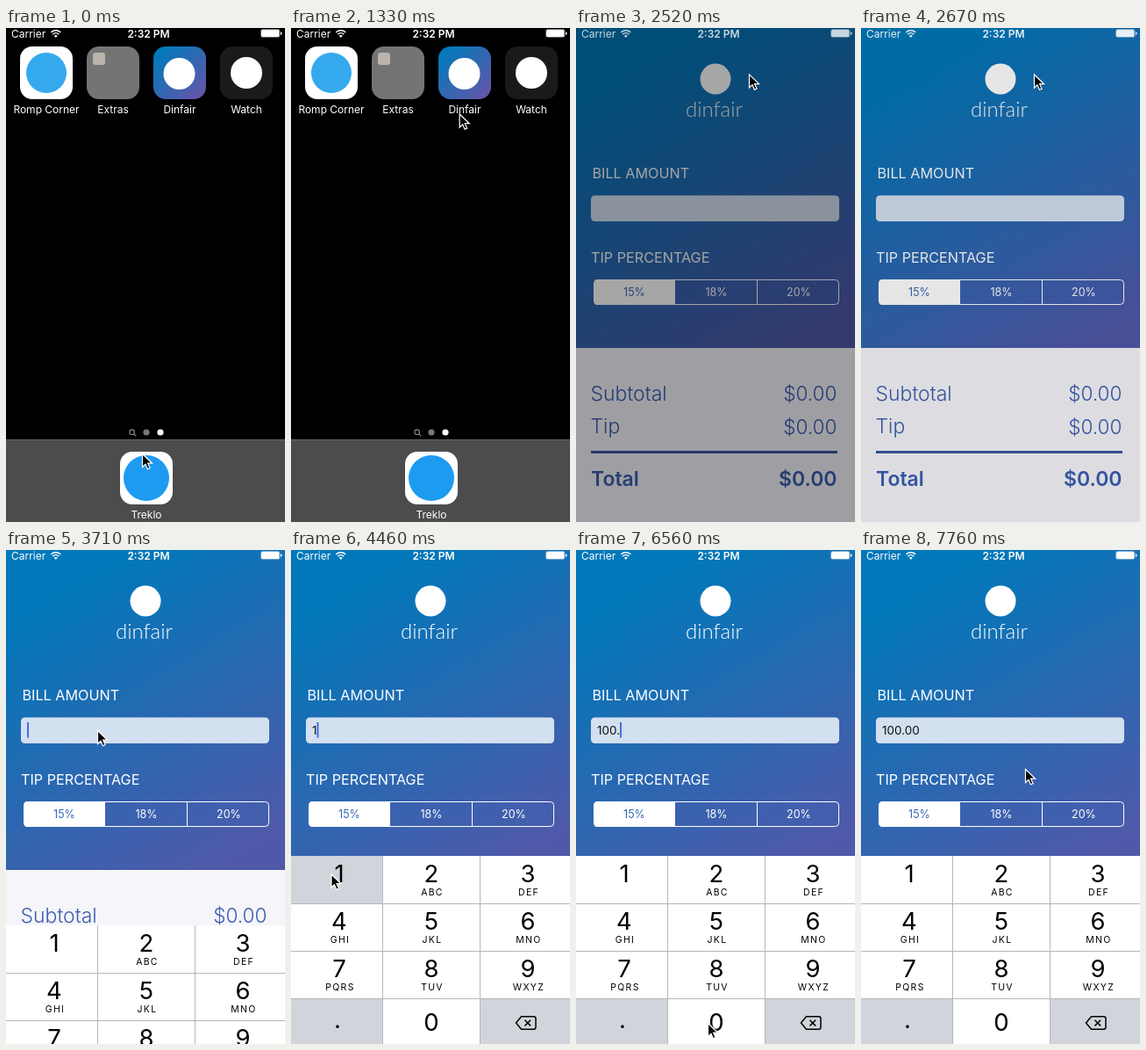
Recreate the animation shown at these times as an HTML page. Size 318 by 562 pixels, loop 8 s.

```html
<!DOCTYPE html>
<html lang="en">
<head>
<meta charset="utf-8">
<title>Tip calculator</title>
<style>
  html, body { margin: 0; width: 100%; height: 100%; overflow: hidden; background: #000; }
  svg { display: block; width: 318px; height: 562px; font-family: Inter, Roboto, sans-serif; }
  .mid { text-anchor: middle; }
  .end { text-anchor: end; }
  .white { fill: #fff; }
  .label { font-size: 12px; fill: #fff; text-anchor: middle; }
  .head { font-size: 16.2px; fill: #fff; }
  .seg { font-size: 12.5px; text-anchor: middle; fill: #fff; }
  .sum { font-size: 23px; font-weight: 300; fill: #3b5db0; }
  .sum .end { font-size: 22.6px; }
  .sum .bold { font-size: 23px; font-weight: 600; }
  .digit { font-size: 27.5px; text-anchor: middle; }
  .letters { font-size: 10.5px; letter-spacing: 1.3px; text-anchor: middle; }
</style>
</head>
<body>
<svg viewBox="0 0 318 562">
  <defs>
    <linearGradient id="tint" x1="0" y1="0" x2="1" y2="1">
      <stop offset=".1" stop-color="#007aba"/><stop offset="1" stop-color="#6c52a7"/>
    </linearGradient>
    <linearGradient id="sky" gradientUnits="userSpaceOnUse" x1="60" y1="10" x2="258" y2="354">
      <stop offset=".08" stop-color="#0078b9"/><stop offset="1" stop-color="#5059a9"/>
    </linearGradient>
  </defs>
  <rect width="318" height="562"/>

  <g id="home">
    <rect class="white" x="16" y="21" width="60" height="60" rx="14"/>
    <circle cx="46" cy="51" r="23" fill="#35a9ee"/>
    <rect x="92" y="21" width="60" height="60" rx="14" fill="#747474"/>
    <rect x="99" y="28" width="14" height="14" rx="3" fill="#b9b4ac"/>
    <rect x="244" y="21" width="60" height="60" rx="14" fill="#1a1a1a"/>
    <circle class="white" cx="274" cy="51" r="18"/>
    <g class="label" id="labels">
      <text x="46" y="97">Romp Corner</text>
      <text x="122" y="97">Extras</text>
      <text x="198" y="97" id="appName">Dinfair</text>
      <text x="274" y="97">Watch</text>
    </g>
    <g fill="none" stroke="#858585" stroke-width="1.2">
      <circle cx="143.7" cy="459.7" r="2.8"/><path d="M145.8 461.8l2.5 2.5"/>
    </g>
    <circle cx="160" cy="460" r="3.6" fill="#777"/>
    <circle class="white" cx="176" cy="460" r="3.6"/>
    <rect y="468" width="318" height="94" fill="#4c4c4c"/>
    <rect y="468" width="318" height="1" fill="#666"/>
    <rect class="white" x="130" y="482" width="60" height="60" rx="14"/>
    <circle cx="160" cy="512" r="26" fill="#1d9bf0"/>
    <text class="label" x="160" y="558">Treklo</text>
  </g>

  <g id="tile">
    <rect width="60" height="60" rx="14"/>
    <g id="tileArt">
      <rect width="60" height="60" rx="14" fill="url(#tint)"/>
      <circle class="white" cx="29.5" cy="31" r="18"/>
    </g>
  </g>

  <g id="app">
    <rect width="318" height="364" fill="url(#sky)"/>
    <rect y="364" width="318" height="198" fill="#f5f5fa"/>
    <circle class="white" cx="159" cy="58" r="17.5"/>
    <text class="mid white" x="157.5" y="101" style="font:300 24px Lato, sans-serif">dinfair</text>
    <text class="head" x="18.5" y="170.5">BILL AMOUNT</text>
    <rect x="17" y="190.5" width="283" height="29.5" rx="4.5" fill="#d3e0f0"/>
    <text id="bill" x="24" y="210" font-size="13.5" fill="#111"></text>
    <rect id="caret" y="196" width="2" height="17.5" fill="#426ee0"/>
    <text class="head" x="17" y="266.5">TIP PERCENTAGE</text>
    <rect x="20.5" y="286.5" width="279" height="28" rx="4" fill="#3f63b2" fill-opacity=".5" stroke="#fff"/>
    <path class="white" d="M113 286H24.5a4 4 0 0 0-4 4v21a4 4 0 0 0 4 4H113z"/>
    <path d="M206.5 286v29" stroke="#fff"/>
    <g class="seg">
      <text x="66.5" y="305" style="fill:#3768b4">15%</text>
      <text x="160" y="305">18%</text>
      <text x="254" y="305">20%</text>
    </g>
    <g class="sum">
      <text x="16.5" y="423.5">Subtotal</text><text class="end" x="297.5" y="423.5">$0.00</text>
      <text x="16.5" y="461">Tip</text><text class="end" x="297.5" y="461.5">$0.00</text>
      <text class="bold" x="17" y="521">Total</text><text class="bold end" x="297.5" y="521">$0.00</text>
    </g>
    <rect x="17" y="481" width="281" height="3" fill="#3b559f"/>
    <g id="pad"></g>
  </g>

  <g id="status" fill="#fff" font-size="12">
    <text x="6" y="10.5">Carrier</text>
    <path d="M51.3 5a8 8 0 0 1 11 0M53.3 7.2a5 5 0 0 1 7 0" fill="none" stroke="#fff" stroke-width="1.5"/>
    <path d="M56.8 11l-2-2.2a3 3 0 0 1 4 0z"/>
    <text class="mid" x="162.5" y="10.5" font-weight="600">2:32 PM</text>
    <rect x="290.5" y="1.5" width="21.5" height="9" rx="2" fill="none" stroke="#fff" stroke-opacity=".5" stroke-width=".8"/>
    <rect x="291" y="2" width="20.5" height="8" rx="1.5"/>
    <rect x="313" y="4.4" width="1.4" height="3.4" rx=".7"/>
  </g>

  <path id="pointer" d="M0 0v15l3.5-3.3 2.4 5.5 2.6-1.1-2.4-5.4h5z" stroke="#fff" stroke-width="1.2"/>
</svg>

<script>
const $ = id => document.getElementById(id);
const PAD_TOP = 348, ROW = 54;

// Number pad
const columns = [[0, 104, 55], [104, 111, 160], [215, 103, 270]];
const letters = ['', 'ABC', 'DEF', 'GHI', 'JKL', 'MNO', 'PQRS', 'TUV', 'WXYZ'];
const rect = (x, y, w, h, fill, id = '') =>
  `<rect id="${id}" x="${x}" y="${y}" width="${w}" height="${h}" fill="${fill}"/>`;
let pad = rect(0, PAD_TOP, 318, 214, '#fff');
for (let i = 0; i < 12; i++) {
  const [x, w, cx] = columns[i % 3], y = PAD_TOP + ROW * (i / 3 | 0);
  const name = i < 9 ? i + 1 : ['.', 0, ''][i - 9];
  pad += rect(x, y, w, ROW, i == 9 || i == 11 ? '#d1d4db' : '#fff', 'key' + name);
  pad += `<text class="digit" x="${i == 9 ? 53 : cx}" y="${y + (i > 9 ? 37 : i == 9 ? 34 : 29.5)}">${name}</text>`;
  if (i < 9) pad += `<text class="letters" x="${cx + 1}" y="${y + 45}">${letters[i]}</text>`;
}
pad += '<path d="M104.5 348v214M215.5 348v214M0 402.5h318M0 456.5h318M0 510.5h318" stroke="#b4b7bc"/>' +
  '<path d="M256.5 538l6-7.3h14a2.5 2.5 0 0 1 2.5 2.5v9.6a2.5 2.5 0 0 1-2.5 2.5h-14zM266.5 534.8l6.6 6.6m0-6.6l-6.6 6.6"' +
  ' fill="none" stroke="#000" stroke-width="1.5"/>';
$('pad').innerHTML = pad;

// Tracks: [step, value...], linear in between
const pointer = [[0, 155.5, 484.5], [1, 165.5, 325.5], [4, 165.5, 325.5], [10, 197.5, 52.5], [18, 197.5, 53],
  [20, 158, 133], [22, 104.5, 205.5], [26, 104.5, 205.5], [29, 46, 369], [31, 46, 369], [34, 141, 540],
  [36, 142.5, 544], [38, 142.5, 544], [41, 50, 537], [42, 50, 537], [44, 150.5, 538.5],
  [48, 150.5, 538.5], [52, 187.5, 249.5]];
const zoom = [[12, 0], [13, .06], [14, .42], [15, .8], [16, 1]];
const art = [[12, 1], [13, .5], [14, .08], [15, 0]];
const labelFade = [[12, 1], [14, .6], [16, .2]];
const appFade = [[15, 0], [16, .25], [17, .65], [18, .9], [19, .97], [20, 1]];
const barFade = [[12, 1], [13, .85], [14, .66], [15, .6], [16, .65], [18, .9], [20, 1]];
const padDrop = [[24, 214], [25, 79], [26, 10], [27, 0]];
const typed = [[30, '1'], [35, '10'], [38, '100'], [42, '100.'], [46, '100.0'], [48, '100.00']];
const presses = { key1: [30], key0: [35, 38, 46, 48] };

function at(track, k) {
  const i = track.findIndex(p => p[0] >= k);
  if (i < 0) return track.at(-1).slice(1);
  if (i == 0) return track[0].slice(1);
  const a = track[i - 1], b = track[i], u = (k - a[0]) / (b[0] - a[0]);
  return a.slice(1).map((v, j) => v + (b[j + 1] - v) * u);
}
const set = (id, name, value) => $(id).setAttribute(name, value);
const show = (id, on) => set(id, 'visibility', on ? 'visible' : 'hidden');

function draw(k) {
  const [p] = at(zoom, k), s = 1 + 4.3 * p;
  const x = 168 * (1 - p), y = 21 * (1 - p);
  const stretch = (60 + 502 * p ** 1.3) / 60;
  set('home', 'transform', `translate(${x} ${y}) scale(${s}) translate(-168 -21)`);
  set('tile', 'transform', `translate(${x} ${y}) scale(${s} ${stretch})`);
  set('tileArt', 'opacity', at(art, k)[0]);
  set('labels', 'opacity', at(labelFade, k)[0]);
  show('appName', k < 13);
  show('home', k < 16);
  show('tile', k < 16);
  set('app', 'opacity', at(appFade, k)[0]);
  set('status', 'opacity', at(barFade, k)[0]);
  set('pad', 'transform', `translate(0 ${at(padDrop, k)[0]})`);

  const text = typed.findLast(e => e[0] <= k)?.[1] || '';
  $('bill').textContent = text;
  set('caret', 'x', 24 + (text ? $('bill').getComputedTextLength() : 0));
  show('caret', k >= 25 && k < 52);
  for (const key in presses) set(key, 'fill', presses[key].includes(k) ? '#d1d4db' : '#fff');
  set('pointer', 'transform', `translate(${at(pointer, k)})`);
}

// The screen refreshes about seven times a second
function frame() {
  const t = performance.now() % 8000;
  draw(t < 2960 ? Math.floor((t + 8) / 148) : Math.min(52, 20 + Math.floor((t - 2960) / 150)));
  requestAnimationFrame(frame);
}
frame();
</script>
</body>
</html>
```
